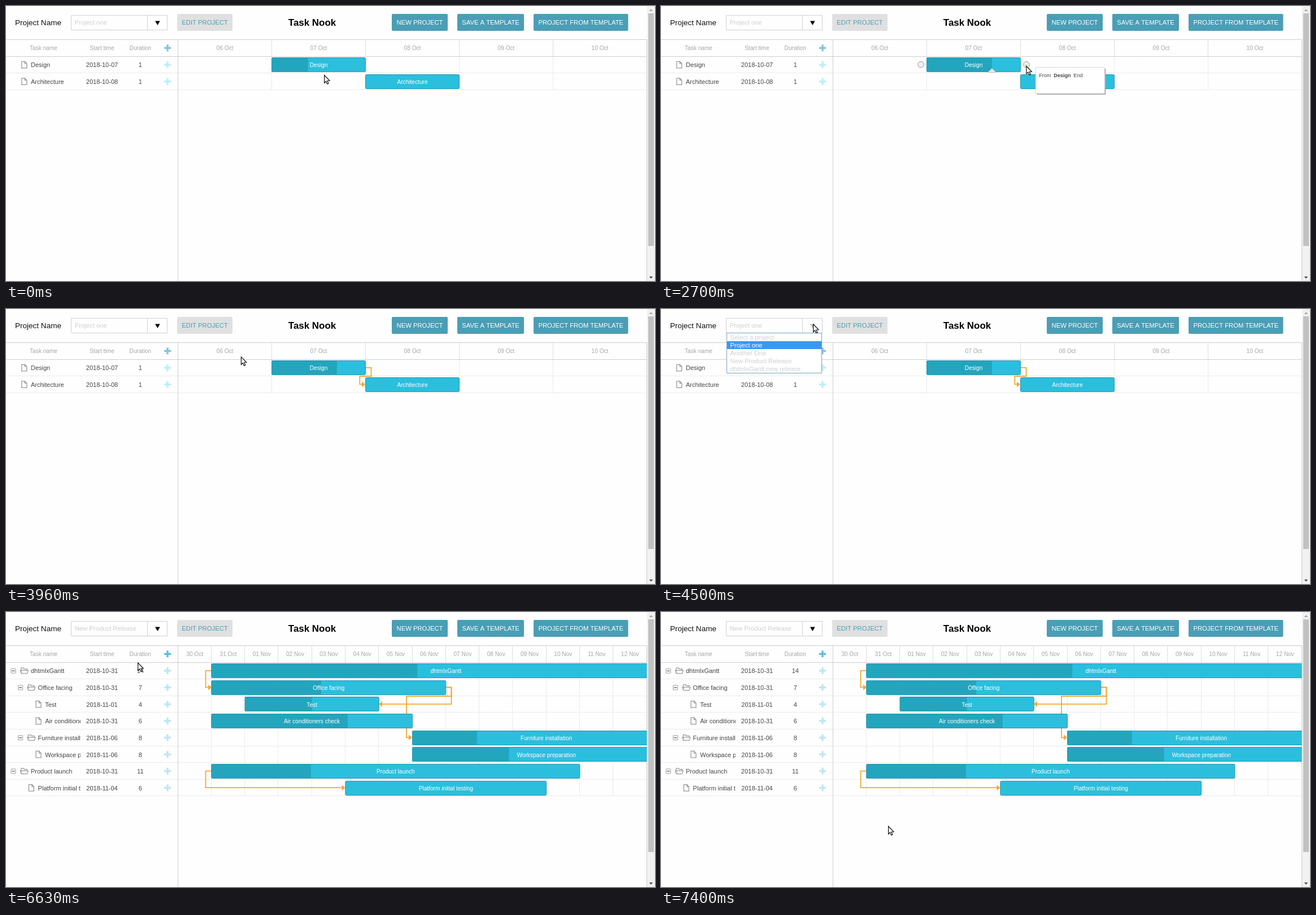
Recreate the animation shown at these times as an HTML page with a canvas. Size 1149 px wide and 487 px high, loop 8000 ms.

```html
<!DOCTYPE html>
<html lang="en">
<head>
<meta charset="utf-8">
<title>Project planner</title>
<style>
html, body { margin: 0; width: 100%; height: 100%; overflow: hidden; background: #fefefe; }
canvas { display: block; }
</style>
</head>
<body>
<canvas id="stage" width="1149" height="487"></canvas>
<script>
const ctx = document.getElementById('stage').getContext('2d');
const LOOP = 8000, TOP = 89, ROW = 29.62, LEFT = 304.5, RIGHT = 1134.5;
const BLUE = '#4a9eb5', ORANGE = '#f2a933', MUTED = '#a6a6a6', FAINT = '#cfcfcf', EDGE = '#cecece';

// start and days are measured in columns of the time scale
const small = {
  firstDay: 6, columns: 5, headPlus: '#80c6d9', rowPlus: '#bdeefa', project: 'Project one',
  rows: [
    { name: 'Design', date: '2018-10-07', days: 1, start: 1, done: 0.385 },
    { name: 'Architecture', date: '2018-10-08', days: 1, start: 2, done: 0 }
  ]
};
const large = {
  firstDay: 30, columns: 14, headPlus: '#5cbedb', rowPlus: '#c0e6f1', project: 'New Product Release',
  rows: [
    { name: 'dhtmlxGantt', date: '2018-10-31', days: 14, start: 1, done: 0.439, level: 0, folder: true },
    { name: 'Office facing', date: '2018-10-31', days: 7, start: 1, done: 0.468, level: 1, folder: true },
    { name: 'Test', date: '2018-11-01', days: 4, start: 2, done: 0.5, level: 2 },
    { name: 'Air conditioners check', date: '2018-10-31', days: 6, start: 1, done: 0.678, level: 2 },
    { name: 'Furniture installation', date: '2018-11-06', days: 8, start: 7, done: 0.241, level: 1, folder: true },
    { name: 'Workspace preparation', date: '2018-11-06', days: 8, start: 7, done: 0.361, level: 2 },
    { name: 'Product launch', date: '2018-10-31', days: 11, start: 1, done: 0.27, level: 0, folder: true },
    { name: 'Platform initial testing', date: '2018-11-04', days: 6, start: 5, done: 0, level: 1 }
  ]
};
const options = ['Select a project', 'Project one', 'Another One', 'New Product Release', 'dhtmlxGantt new release'];

// pointer stops: time, x, y
const stops = [
  [30, 563, 122], [200, 534, 109], [700, 534, 109], [1060, 585, 108],
  [1430, 585, 108], [1600, 600, 118], [1630, 600, 118], [2000, 652, 110],
  [2230, 652, 110], [2360, 647, 105], [2660, 647, 105], [3040, 626, 135],
  [3130, 625, 139], [3460, 625, 139], [3600, 596, 143], [4260, 280, 40],
  [4300, 280, 40], [4460, 269, 26.5], [4630, 269, 26.5], [5100, 235, 77],
  [5130, 235, 77], [5200, 233, 84], [5740, 233, 84], [5760, 232.6, 84],
  [6060, 232.6, 84], [6360, 233, 89.5], [6630, 233, 89.5], [7400, 402, 379]
];

const clamp = v => Math.max(0, Math.min(1, v));
const smooth = v => v * v * (3 - 2 * v);
const rowY = i => TOP + ROW * (i + 0.5) + 0.4;

function pointerAt(t) {
  let from = stops[0];
  for (const to of stops) {
    if (t < to[0]) {
      const k = smooth(clamp((t - from[0]) / (to[0] - from[0] || 1)));
      return [from[1] + (to[1] - from[1]) * k, from[2] + (to[2] - from[2]) * k];
    }
    from = to;
  }
  return [from[1], from[2]];
}

function rect(x, y, w, h, color) {
  ctx.fillStyle = color;
  ctx.fillRect(x, y, w, h);
}

function box(x, y, w, h, r, fill, stroke) {
  ctx.beginPath();
  ctx.roundRect(x, y, w, h, r);
  if (fill) { ctx.fillStyle = fill; ctx.fill(); }
  if (stroke) { ctx.strokeStyle = stroke; ctx.lineWidth = 1; ctx.stroke(); }
}

function text(value, x, cy, size, color, align = 'left', weight = '') {
  ctx.font = `${weight} ${size}px "Liberation Sans", Arial, sans-serif`;
  ctx.textAlign = align;
  ctx.fillStyle = color;
  ctx.fillText(value, x, cy + size * 0.36);
}

function trace(points, close) {
  ctx.beginPath();
  points.forEach(([x, y]) => ctx.lineTo(x, y));
  if (close) ctx.closePath();
}

function polygon(points, fill) {
  trace(points, true);
  ctx.fillStyle = fill;
  ctx.fill();
}

function line(points, color, width) {
  trace(points);
  ctx.strokeStyle = color;
  ctx.lineWidth = width;
  ctx.stroke();
}

function clipped(x, y, w, h, draw) {
  ctx.save();
  ctx.beginPath();
  ctx.rect(x, y, w, h);
  ctx.clip();
  draw();
  ctx.restore();
}

function plus(y, color) {
  rect(280, y - 1.7, 12, 3.4, color);
  rect(284.3, y - 6, 3.4, 12, color);
}

function button(x, w, label, fill, color) {
  box(x, 14, w, 30, 2, fill);
  text(label, x + w / 2, 29.2, 11.28, color, 'center');
}

function topBar(project, open) {
  text('Project Name', 16, 29.3, 13.54, '#111');
  box(115.5, 16.5, 170, 26, 0, '#fefefe', '#d0d0d0');
  line([[250.5, 16], [250.5, 43]], '#d0d0d0', 1);
  text(project, 121.7, 29.4, 11.28, FAINT);
  polygon([[264, 26.5], [272.6, 26.5], [268.3, 34]], open ? '#bdbdbd' : '#000');
  button(303, 98, 'EDIT PROJECT', '#e0e0e0', BLUE);
  text('Task Nook', 542, 28.8, 16.93, '#000', 'center', 'bold');
  button(683, 99, 'NEW PROJECT', BLUE, '#fff');
  button(799, 118, 'SAVE A TEMPLATE', BLUE, '#fff');
  button(934, 167.5, 'PROJECT FROM TEMPLATE', BLUE, '#fff');
}

function scrollbar() {
  rect(1135, 0, 14, 487, '#f1f1f1');
  rect(1137, 13, 10, 412, '#c1c1c1');
  polygon([[1138.7, 9], [1145.3, 9], [1142, 5.5]], '#a3a3a3');
  polygon([[1138.7, 479], [1145.3, 479], [1142, 482.7]], '#505050');
}

function fileIcon(x, y) {
  line([[x + 1, y - 5.5], [x - 4.5, y - 5.5], [x - 4.5, y + 6], [x + 4.5, y + 6],
    [x + 4.5, y - 2], [x + 1, y - 5.5], [x + 1, y - 2], [x + 4.5, y - 2]], '#999', 1.3);
}

function folderIcon(x, y) {
  line([[x - 5.5, y + 4.5], [x - 5.5, y - 5], [x - 1, y - 5], [x, y - 3.3], [x + 5, y - 3.3], [x + 5, y - 1]], '#999', 1.2);
  trace([[x - 5, y + 4.7], [x - 7, y - 0.8], [x + 7, y - 0.8], [x + 5.2, y + 4.7]], true);
  ctx.stroke();
}

function toggle(x, y) {
  box(x - 4, y - 4, 8, 8, 0.5, '#fff', '#9a9a9a');
  line([[x - 2.4, y], [x + 2.4, y]], '#444', 1.2);
}

function table(view) {
  const bottom = TOP + ROW * view.rows.length, col = (RIGHT - LEFT) / view.columns;
  line([[0, 59.5], [RIGHT, 59.5]], EDGE, 1);
  line([[0, 89.5], [RIGHT, 89.5]], EDGE, 1);
  text('Task name', 42, 74.6, 10.15, MUTED);
  text('Start time', 170, 74.6, 10.15, MUTED, 'center');
  text('Duration', 237.7, 74.6, 10.15, MUTED, 'center');
  plus(74.3, view.headPlus);

  for (let i = 0; i < view.columns; i++) {
    const day = view.firstDay + i, november = day > 31;
    const label = String(november ? day - 31 : day).padStart(2, '0') + (november ? ' Nov' : ' Oct');
    text(label, LEFT + col * (i + 0.5), 74.6, 10.15, MUTED, 'center');
    if (!i) continue;
    const x = Math.floor(LEFT + col * i - 0.5) + 0.5;
    line([[x, 60], [x, 89]], '#dedede', 1);
    line([[x, 90], [x, bottom]], '#ebebeb', 1);
  }
  view.rows.forEach((row, i) => {
    const y = rowY(i), shift = 12.6 * (row.level || 0);
    const edge = Math.floor(TOP + ROW * (i + 1)) + 0.5;
    line([[0, edge], [RIGHT, edge]], '#ebebeb', 1);
    if (row.folder) {
      toggle(13 + shift, y);
      folderIcon(32.3 + shift, y);
    } else fileIcon(32.3 + shift, y - 0.4);
    clipped(0, TOP, 132, 300, () => text(row.name, 44 + shift, y + 0.3, 11, '#454545'));
    text(row.date, 170, y + 0.3, 11, '#454545', 'center');
    text(row.days, 237.8, y + 0.3, 11, '#454545', 'center');
    plus(y - 0.2, view.rowPlus);
  });
  line([[304.5, 59], [304.5, 487]], EDGE, 1);
  line([[RIGHT, 59], [RIGHT, 487]], EDGE, 1);
}

function link(points, dir = 1) {
  const [x, y] = points[points.length - 1];
  line([...points.slice(0, -1), [x - 4 * dir, y]], ORANGE, 1.8);
  polygon([[x, y], [x - 6 * dir, y - 5], [x - 6 * dir, y + 5]], ORANGE);
}

function links(view, linked) {
  const y = i => rowY(i) - 0.4;
  if (view === small) {
    if (linked) link([[636, y(0)], [646.5, y(0)], [646.5, 119], [626.3, 119], [626.3, y(1)], [636, y(1)]]);
    return;
  }
  link([[364, y(0)], [353.5, y(0)], [353.5, y(1)], [364, y(1)]]);
  link([[778, y(1)], [788.5, y(1)], [788.5, y(2)], [660, y(2)]], -1);
  link([[778, y(1)], [788.5, y(1)], [788.5, 149], [709, 149], [709, y(4)], [719, y(4)]]);
  link([[364, y(6)], [353.5, y(6)], [353.5, y(7)], [600.5, y(7)]]);
}

function bars(view, progress) {
  const col = (RIGHT - LEFT) / view.columns;
  clipped(LEFT, 60, RIGHT - LEFT, 427, () => view.rows.forEach((row, i) => {
    const x = LEFT + col * row.start, w = col * row.days, y = Math.round(rowY(i) - 13) + 0.5;
    const done = row.name === 'Design' ? progress : row.done;
    box(x, y, w, 25, 2, '#2bbfdd');
    rect(x, y, w * done, 25, '#23a5bd');
    box(x, y, w, 25, 2, null, '#2197b0');
    text(row.name, x + w / 2, rowY(i) + 0.6, 10.15, '#fff', 'center');
  }));
}

function handles(i, progress) {
  const row = small.rows[i], x = LEFT + 166 * row.start, y = rowY(i) - 0.5;
  for (const cx of [x - 10.5, x + 176.5]) box(cx - 5.3, y - 5.3, 10.6, 10.6, 5.3, '#f0f0f0', '#969696');
  const px = x + 166 * progress;
  polygon([[px, y + 6.5], [px - 7.5, y + 14], [px + 7.5, y + 14]], '#e9e5e4');
  line([[px - 7.5, y + 14], [px + 7.5, y + 14]], '#cbb9b4', 0.8);
}

function linkDrag(x, y, onTarget) {
  ctx.setLineDash([5, 3]);
  line([[646.5, 104], [x, y]], ORANGE, 1.7);
  ctx.setLineDash([]);
  const left = x + 17, top = y + 3;
  rect(left + 2, top + 2, 122, 46, '#aaa');
  box(left, top, 122, 46, 0, '#fff', '#d5d5d5');
  text('From', left + 6, top + 14, 9.1, '#444');
  text('Design', left + 32, top + 14, 9.1, '#444', 'left', 'bold');
  text('End', left + 67, top + 14, 9.1, '#444');
  if (!onTarget) return;
  text('To', left + 6, top + 32, 9.1, '#444');
  text('Architecture', left + 20, top + 32, 9.1, '#444', 'left', 'bold');
  text('Start', left + 80, top + 32, 9.1, '#444');
}

function dropdown(pointerY) {
  const active = pointerY < 43 ? 1 : Math.min(4, Math.floor((pointerY - 42) / 13.95));
  box(116.5, 42.5, 168, 71, 0, '#fff', '#7c9fc9');
  options.forEach((label, i) => {
    const y = 50 + 13.95 * i;
    if (i === active) rect(117, Math.round(y - 7), 167, 14, '#3d97ef');
    text(label, 122.5, y, 11.28, i === active ? '#fff' : FAINT);
  });
}

function cursor(x, y) {
  trace([[x + 0.6, y + 0.6], [x + 0.6, y + 14.2], [x + 3.5, y + 11.3], [x + 5.7, y + 16.3],
    [x + 8, y + 15.3], [x + 5.9, y + 10.5], [x + 10, y + 10.3]], true);
  ctx.fillStyle = '#fff';
  ctx.fill();
  ctx.strokeStyle = '#111';
  ctx.lineWidth = 1.2;
  ctx.stroke();
}

function draw(t) {
  const [x, y] = pointerAt(t);
  const view = t < 6130 ? small : large;
  const progress = 0.385 + 0.31 * smooth(clamp((t - 700) / 360));
  const open = t >= 4430 && t < 6060;
  const onTarget = t >= 2930 && t < 3500;
  const dragging = t >= 2690 && t < 3060;

  rect(0, 0, 1149, 487, '#fefefe');
  topBar(t < 6060 ? small.project : large.project, open);
  table(view);
  links(view, t >= 3080);
  bars(view, progress);
  if ((t >= 90 && t < 1530) || (t >= 2230 && t < 2930)) handles(0, progress);
  if (onTarget) handles(1, 0);
  if (dragging) linkDrag(x, y, onTarget);
  scrollbar();
  if (open) dropdown(y);
  cursor(x, y);
}

function tick() {
  draw(performance.now() % LOOP);
  requestAnimationFrame(tick);
}
tick();
</script>
</body>
</html>
```
